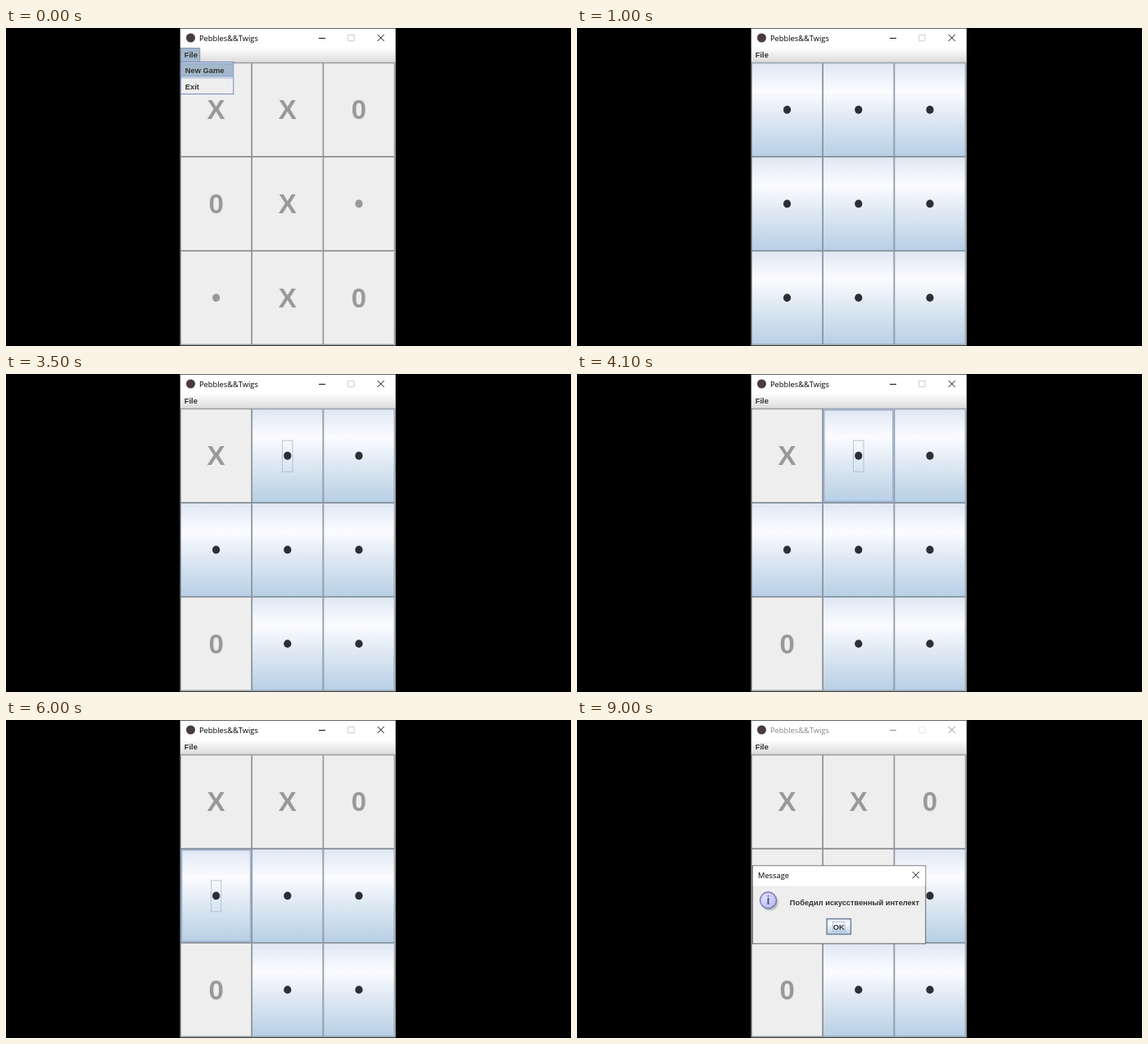
Recreate the animation shown at these times as an HTML page. Size 690x388 px, loop 9.2 s.

```html
<!DOCTYPE html>
<html lang="en">
<head>
<meta charset="utf-8">
<title>Pebbles&amp;&amp;Twigs</title>
<style>
html, body { margin: 0; width: 100%; height: 100%; overflow: hidden; background: #000; }
svg { display: block; width: 690px; height: 388px; }
text { font: bold 9.3px "Liberation Sans", Arial, sans-serif; fill: #333; }
.caption { font: 9.3px "Open Sans", "Noto Sans", sans-serif; fill: #000; }
.mark { font-size: 33px; fill: #999; text-anchor: middle; }
.mid { text-anchor: middle; }
.glyph { fill: none; stroke: #111; }

.part { animation: 9200ms step-end infinite; visibility: hidden; }
.over { animation-name: over; }
.move1 { animation-name: move1; }
.move2 { animation-name: move2; }
.move3 { animation-name: move3; }
.focus1 { animation-name: focus1; }
.hover1 { animation-name: hover1; }
.focus2 { animation-name: focus2; }
.hover2 { animation-name: hover2; }
@keyframes over { 0% { visibility: visible } 10.869%, 100% { visibility: hidden } }
@keyframes move1 { 0% { visibility: hidden } 38.043%, 100% { visibility: visible } }
@keyframes move2 { 0% { visibility: hidden } 57.608%, 100% { visibility: visible } }
@keyframes move3 { 0% { visibility: hidden } 81.521%, 100% { visibility: visible } }
@keyframes focus1 { 0% { visibility: hidden } 38.043% { visibility: visible } 57.608%, 100% { visibility: hidden } }
@keyframes hover1 { 0% { visibility: hidden } 43.478% { visibility: visible } 57.608%, 100% { visibility: hidden } }
@keyframes focus2 { 0% { visibility: hidden } 57.608% { visibility: visible } 81.521%, 100% { visibility: hidden } }
@keyframes hover2 { 0% { visibility: hidden } 65.217% { visibility: visible } 81.521%, 100% { visibility: hidden } }
</style>
</head>
<body>
<svg viewBox="0 0 690 388">
  <defs>
    <linearGradient id="steel" x2="0" y2="1">
      <stop offset="0" stop-color="#dfe7f3"/>
      <stop offset=".3" stop-color="#fcfcff"/>
      <stop offset=".6" stop-color="#dde8f3"/>
      <stop offset="1" stop-color="#b8cfe5"/>
    </linearGradient>
    <linearGradient id="bar" x2="0" y2="1">
      <stop offset="0" stop-color="#fff"/>
      <stop offset="1" stop-color="#dcdcdc"/>
    </linearGradient>
    <radialGradient id="orb" cx=".4" cy=".35" r=".7">
      <stop offset="0" stop-color="#e4e4ff"/>
      <stop offset="1" stop-color="#b4b4f0"/>
    </radialGradient>
    <radialGradient id="shade">
      <stop offset=".7" stop-color="#999" stop-opacity=".7"/>
      <stop offset="1" stop-color="#999" stop-opacity="0"/>
    </radialGradient>
  </defs>

  <rect width="690" height="388"/>
  <rect x="212.3" width="263.7" height="387.6" fill="#666"/>
  <rect x="213" y="1" width="262.4" height="385.8" fill="#eee"/>
  <rect x="213" y="1" width="262.4" height="23" fill="#fff"/>
  <circle cx="225.5" cy="12" r="5.5" fill="#493b40"/>
  <text class="caption" x="236" y="15.7">Pebbles&amp;&amp;Twigs</text>
  <path class="glyph" d="M382 12.5h8M453.7 8l8 8m0-8l-8 8"/>
  <path class="glyph" d="M417.8 8.3h7.4v7.4h-7.4z" style="stroke:#ccc"/>
  <rect x="213" y="24" width="262.4" height="17.6" fill="url(#bar)"/>
  <rect x="213" y="41.5" width="262.4" height=".9" fill="#b8b8b8"/>
  <g class="part over">
    <rect x="213.4" y="24.4" width="23.4" height="17" fill="#a3b8cc" stroke="#7a8a99" stroke-width=".8"/>
  </g>
  <text x="217.8" y="36">File</text>

  <g id="board"></g>

  <g class="part over">
    <rect x="213.4" y="41.4" width="64.4" height="39.2" fill="#eee" stroke="#6382bf" stroke-width=".9"/>
    <rect x="213.8" y="43.3" width="63.6" height="15.6" fill="#a3b8cc"/>
    <path d="M213.8 43.2h63.6M213.8 59h63.6" stroke="#6382bf" stroke-width=".7"/>
    <path d="M213.8 60.9h63.6" stroke="#8fa7d4" stroke-width=".8"/>
    <text x="218.8" y="54.5">New Game</text>
    <text x="218.8" y="74.5">Exit</text>
  </g>

  <g class="part move3">
    <rect x="234" y="2" width="238" height="21" fill="#fff" opacity=".53"/>
    <rect x="214.4" y="177.9" width="211.4" height="95" fill="#eee" stroke="#555" stroke-width=".9"/>
    <rect x="214.9" y="178.4" width="210.4" height="24.2" fill="#fff"/>
    <text class="caption" x="221" y="193.2">Message</text>
    <path class="glyph" d="M409.7 185.2l8 8m0-8l-8 8"/>
    <circle cx="235.6" cy="222.4" r="11.5" fill="url(#shade)"/>
    <circle cx="233.5" cy="219.9" r="10" fill="url(#orb)" stroke="#6969ab" stroke-width="1.1"/>
    <text class="mid" x="233.5" y="225" style="font-size:14.5px;fill:#4b4b8c">i</text>
    <text x="259.8" y="226.2">Победил искусственный интелект</text>
    <rect x="305.2" y="242.6" width="29.2" height="18.8" fill="url(#steel)" stroke="#71839a" stroke-width="1.5"/>
    <rect x="312.3" y="246.4" width="14.8" height="11.4" fill="none" stroke="#9fb3d0" stroke-width=".8"/>
    <text class="mid" x="319.8" y="255.6">OK</text>
  </g>
</svg>
<script>
const W = 87.2, H = 114.7;
const board = document.getElementById("board");

function add(index, body, part) {
  const x = 213 + index % 3 * W, y = 42.4 + Math.floor(index / 3) * H;
  const cls = part ? `part ${part}` : "";
  board.insertAdjacentHTML("beforeend",
    `<g class="${cls}" transform="translate(${x} ${y})">${body}</g>`);
}

const box = (fill, line) =>
  `<rect x=".4" y=".4" width="${W - .8}" height="${H - .8}" fill="${fill}" stroke="${line}" stroke-width=".9"/>`;
const dot = fill =>
  `<ellipse cx="${W / 2}" cy="${H / 2}" rx="4.6" ry="4.9" fill="${fill}"/>`;
const used = sign => box("#eee", "#909090") +
  (sign === "." ? dot("#999") : `<text class="mark" x="${W / 2}" y="69">${sign}</text>`);

const ring = `<rect x="1.6" y="1.6" width="${W - 3.2}" height="${H - 3.2}" fill="none" stroke="#9fb2d0" stroke-width="1.5"/>`;
const focus = `<rect x="${W / 2 - 6.2}" y="38.8" width="12.4" height="38" fill="none" stroke="#a3b8cc" stroke-width=".8"/>`;

for (let i = 0; i < 9; i++) add(i, box("url(#steel)", "#7a8a99") + dot("#2c3036"));

add(1, ring, "hover1");
add(1, focus, "focus1");
add(3, ring, "hover2");
add(3, focus, "focus2");

[[0, "X", "move1"], [6, "0", "move1"],
 [1, "X", "move2"], [2, "0", "move2"],
 [3, "X", "move3"], [4, "0", "move3"]].forEach(([i, sign, part]) => add(i, used(sign), part));

[..."XX00X..X0"].forEach((sign, i) => add(i, used(sign), "over"));
</script>
</body>
</html>
```
